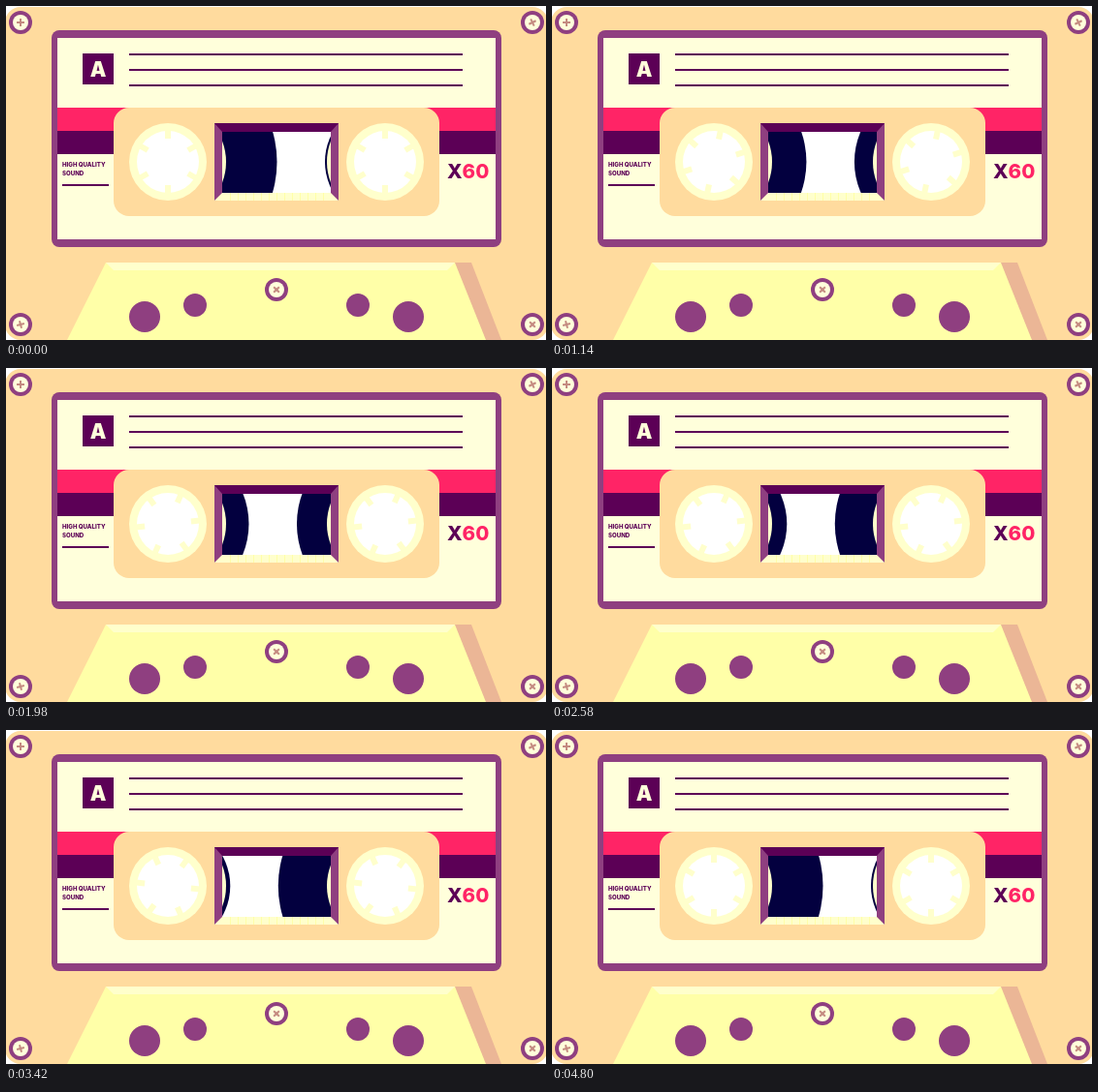
An HTML page with a canvas that plays this animation: 557x345 px, repeating every 5.1 s.

```html
<!DOCTYPE html>
<html lang="en">
<head>
<meta charset="utf-8">
<title>Cassette</title>
<style>
  html, body { margin: 0; width: 100%; height: 100%; overflow: hidden; background: #fff; }
  canvas { display: block; }
</style>
</head>
<body>
<canvas id="stage" width="557" height="345"></canvas>
<script>
const ctx = document.getElementById('stage').getContext('2d');
const PEACH = '#ffdb9e', CREAM = '#ffffdb', PALE = '#ffffcc', YELLOW = '#ffffa8';
const MAUVE = '#8f3f80', PLUM = '#5c0056', RED = '#ff2466', TAPE = '#03003f';
const LOOP = 5100, STEP = 30, HOLD = 300, PLAY = 3600, REWIND = 900;

// The layout is symmetric about x = 0 and sits on a grid of U pixels.
const U = 8, TURN = Math.PI * 2;
const REEL_X = 14 * U, AXIS = 20 * U, TEETH = 6, TURNS = 2;
const HUB = 60, SMALL_ROLL = 62, BIG_ROLL = 112.5;
const SIDES = [-1, 1];

function box(x, y, w, h, color, radius = 0) {
  ctx.fillStyle = color;
  ctx.beginPath();
  ctx.roundRect(x, y, w, h, radius);
  ctx.fill();
}

const centredBox = (half, y, h, color, radius) => box(-half, y, 2 * half, h, color, radius);

function disc(x, y, r, color) {
  ctx.fillStyle = color;
  ctx.beginPath();
  ctx.arc(x, y, r, 0, TURN);
  ctx.fill();
}

// Four-sided shape with level top and bottom edges.
function slab(color, y1, left1, right1, y2, left2, right2) {
  ctx.fillStyle = color;
  ctx.beginPath();
  ctx.moveTo(left1, y1);
  ctx.lineTo(right1, y1);
  ctx.lineTo(right2, y2);
  ctx.lineTo(left2, y2);
  ctx.fill();
}

function label(text, x, y, size, color, weight = 800) {
  ctx.font = `${weight} ${size}px Inter, sans-serif`;
  ctx.fillStyle = color;
  ctx.fillText(text, x, y);
  return ctx.measureText(text).width;
}

function rotated(x, y, angle, paint) {
  ctx.save();
  ctx.translate(x, y);
  ctx.rotate(angle);
  paint();
  ctx.restore();
}

function screw(x, y, angle) {
  disc(x, y, 12, MAUVE);
  disc(x, y, U, CREAM);
  rotated(x, y, angle, () => {
    centredBox(4, -1, 2, '#c48a80');
    centredBox(1, -4, 8, '#c48a80');
  });
}

function reel(x, angle) {
  disc(x, AXIS, 5 * U, PALE);
  disc(x, AXIS, 4 * U, '#fff');
  for (let i = 0; i < TEETH; i++) {
    rotated(x, AXIS, angle + i * TURN / TEETH, () => box(3 * U, -3, U + 1, 6, PALE));
  }
}

function drawWindow(wound) {
  const outer = 8 * U, inner = 7 * U, top = 16 * U, bottom = 24 * U;
  const transfer = (BIG_ROLL - SMALL_ROLL) * wound;
  ctx.save();
  ctx.beginPath();
  ctx.rect(-inner, top, 2 * inner, bottom - top);
  ctx.clip();
  centredBox(inner, top, bottom - top, '#fff');
  disc(-REEL_X, AXIS, BIG_ROLL - transfer, TAPE);
  disc(REEL_X, AXIS, SMALL_ROLL + transfer, TAPE);
  for (const side of SIDES) disc(side * REEL_X, AXIS, HUB, PALE);
  ctx.restore();

  centredBox(outer, top - U, U, MAUVE);
  for (const side of SIDES) {
    slab(MAUVE, top - U, side * outer, side * inner, bottom + U, side * outer, side * inner);
  }
  slab(PLUM, top - U, -outer, outer, top + 1, -inner, inner);
  slab(PALE, bottom, -inner, inner, bottom + U, -outer, outer);
  for (let x = U - inner; x < inner; x += U) box(x, bottom, 1, U, YELLOW);
}

function drawLabel() {
  const half = 226, left = -221;
  centredBox(29 * U, 3 * U, 28 * U, MAUVE, U);
  centredBox(half, 4 * U, 26 * U, CREAM);
  centredBox(half, 13 * U, 3 * U, RED);
  centredBox(half, 16 * U, 3 * U, PLUM);
  centredBox(21 * U, 13 * U, 14 * U, PEACH, 2 * U);

  box(-25 * U, 6 * U, 4 * U, 4 * U, PLUM);
  ctx.textAlign = 'center';
  label('A', -23 * U, 9 * U - 0.5, 21, CREAM, 900);
  ctx.textAlign = 'left';
  for (let row = 6; row <= 10; row += 2) box(-19 * U, row * U, 43 * U, 2, PLUM);

  label('HIGH QUALITY', left, 165, 6.1, PLUM);
  label('SOUND', left, 174, 6.1, PLUM);
  box(left, 183, 6 * U, 2, PLUM);
  const price = 22 * U;
  label('60', price + label('X', price, 177, 20.5, PLUM), 177, 20.5, RED);
}

function drawBase() {
  const top = 33 * U, bottom = 43 * U;
  slab('#ebb696', top, 22 * U, 25 * U + 1, bottom, 26 * U, 29 * U);
  slab(YELLOW, top, -22 * U, 23 * U, bottom, -27 * U, 27 * U);
  slab(PALE, top, -22 * U, 23 * U, top + U, -21 * U, 22 * U);
  for (const side of SIDES) {
    disc(side * 17 * U, 40 * U, 2 * U, MAUVE);
    disc(side * 10.5 * U, 38.5 * U, 1.5 * U, MAUVE);
  }
  screw(0, 36.5 * U, TURN / 8);
}

function drawBody() {
  centredBox(35 * U, 0, 43 * U, PEACH, 2 * U);
  const corner = 33 * U, high = 2 * U, low = 41 * U;
  screw(-corner, high, 0);
  screw(corner, high, -TURN / 14);
  screw(-corner, low, -TURN / 24);
  screw(corner, low, TURN / 8);
}

// Share of the playing run completed, undone by the rewind.
function tapeProgress(t) {
  const played = Math.min(1, t / PLAY);
  const rewound = Math.min(1, Math.max(0, (t - PLAY - HOLD) / REWIND));
  return played - rewound;
}

function draw(now) {
  const t = Math.floor((now % LOOP) / STEP) * STEP;
  const progress = tapeProgress(t);
  const wound = progress + 0.1 * progress * (1 - progress);
  const angle = TURN / 12 - progress * TURNS * TURN;

  ctx.setTransform(1, 0, 0, 1, 0, 0);
  ctx.clearRect(0, 0, 557, 345);
  ctx.translate(279, 1);
  drawBody();
  drawLabel();
  for (const side of SIDES) reel(side * REEL_X, angle);
  drawWindow(wound);
  drawBase();
}

const start = performance.now();
function tick() {
  draw(performance.now() - start);
  requestAnimationFrame(tick);
}
tick();
</script>
</body>
</html>
```
